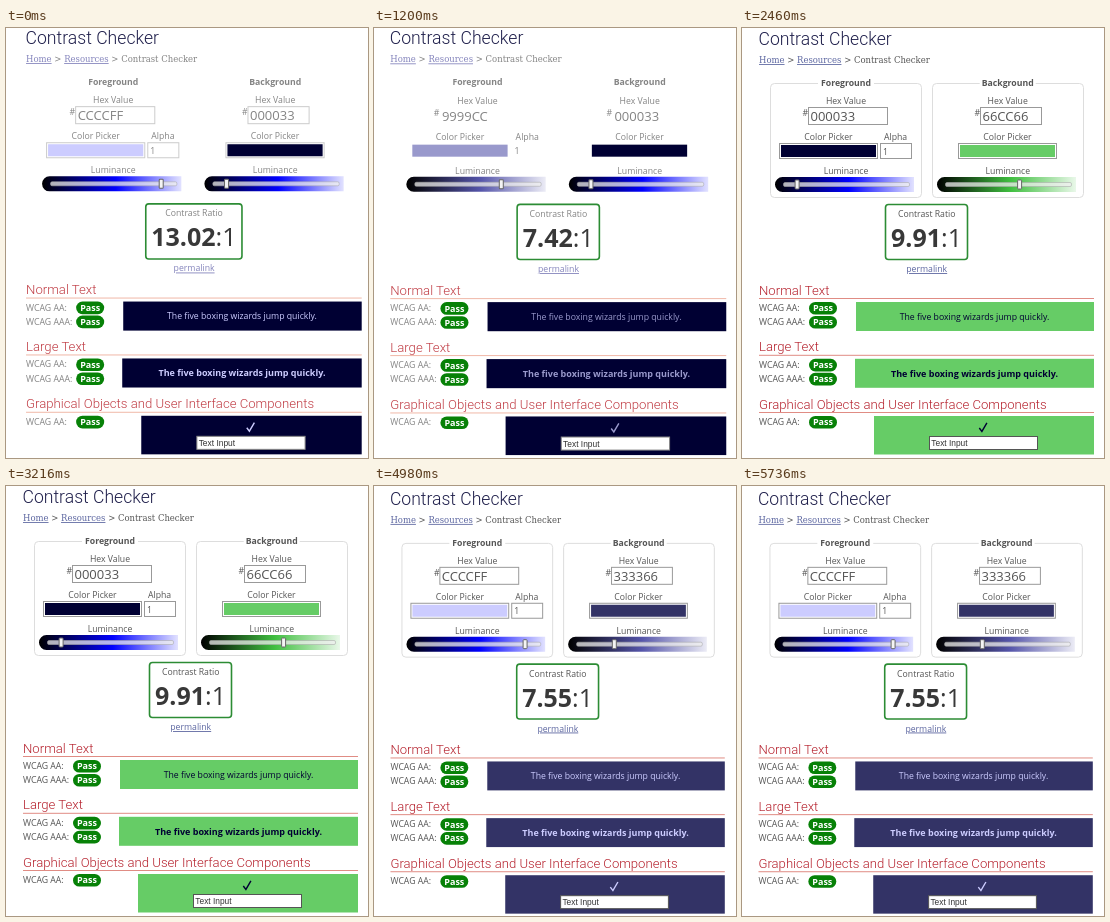
An HTML page that plays this animation: 362 by 430 pixels, repeating every 6.24 s.

```html
<!DOCTYPE html>
<html lang="en">
<head>
<meta charset="utf-8">
<title>Contrast Checker</title>
<style>
html, body { margin: 0; width: 100%; height: 100%; overflow: hidden; background: #fff; }
svg { display: block; position: absolute; left: 0; top: 0; }
text { font: 8.7px "Open Sans", "Noto Sans", sans-serif; fill: var(--ink); }
.slide { --ink: #555; --link: #5c66a0; --edge: #999; --line: #e08c84; --frame: #ddd; --red: #b5202c; }
.pale { --ink: #848484; --link: #8484bc; --edge: #ccc; --line: #f0b8a8; --frame: none; --red: #c03c44; }
.bare { --edge: none; }
.mid { text-anchor: middle; }
.bold { font-weight: 700; }
.title { font: 300 17.6px Roboto, sans-serif; fill: #20204c; }
.head { font: 300 13.15px Roboto, sans-serif; fill: var(--red); }
.crumb { font: 8.48px "DejaVu Serif", serif; }
.link { fill: var(--link); text-decoration: underline; }
.hex { font-size: 13px; }
.ratio { font-size: 25px; fill: #383838; }
.pass { font-size: 9px; font-weight: 700; fill: #fff; }
.large { font-size: 9px; font-weight: 700; }
.input { font: 8.4px "Liberation Sans", Arial, sans-serif; fill: #333; }
.s1, .s2, .s3, .s4 { animation: 6240ms step-end infinite; }
.s1 { animation-name: second; }
.s2 { animation-name: third; }
.s3 { animation-name: fourth; }
.s4 { animation-name: fifth; }
@keyframes second { 0% { visibility: hidden } 19.2307% { visibility: visible } }
@keyframes third { 0% { visibility: hidden } 39.423% { visibility: visible } }
@keyframes fourth { 0% { visibility: hidden } 59.6153% { visibility: visible } }
@keyframes fifth { 0% { visibility: hidden } 79.8076% { visibility: visible } }
</style>
</head>
<body>
<svg id="stage" width="362" height="430" viewBox="0 0 362 430"></svg>
<script>
// Each slide covers the ones before it; place = x, y, scale.
const slides = [
  { fg: 'CCCCFF', bg: '000033', ratio: '13.02', place: [3, -1, 1.002], look: 'pale' },
  { fg: '9999CC', bg: '000033', ratio: '7.42', place: [-0.8, -0.7, 1.003], look: 'pale bare' },
  { fg: '000033', bg: '66CC66', ratio: '9.91', place: [0, 0, 1], look: '' },
  { fg: '333333', bg: 'CCCCFF', ratio: '8.21', place: [7, 3, 0.98], look: '' },
  { fg: 'CCCCFF', bg: '333366', ratio: '7.55', place: [-0.5, 2, 0.998], look: '' }
];

const text = (x, y, cls, str, extra = '') =>
  `<text x="${x}" y="${y}" class="${cls}" ${extra}>${str}</text>`;
const rect = (x, y, w, h, fill, extra = '') =>
  `<rect x="${x}" y="${y}" width="${w}" height="${h}" fill="${fill}" ${extra}/>`;
const edge = 'stroke="var(--edge)"';

// Lightness of a hex colour, and the same hue at half lightness.
function tone(hex) {
  const rgb = [0, 2, 4].map(i => parseInt(hex.slice(i, i + 2), 16));
  const max = Math.max(...rgb), min = Math.min(...rgb), range = max - min;
  const sat = range / (255 - Math.abs(max + min - 255));
  const mid = rgb.map(c => Math.round(127.5 + 255 * sat * (range ? (c - min) / range - 0.5 : 0)));
  return { light: (max + min) / 510, mid: `rgb(${mid})` };
}

function slider(x, hex, id) {
  const { light, mid } = tone(hex);
  return `<linearGradient id="${id}" x2="1.06"><stop stop-color="#000"/>
    <stop offset=".5" stop-color="${mid}"/><stop offset="1" stop-color="#fff"/></linearGradient>
    <path d="M${x + 139} 149H${x + 7.5}a7.5 7.5 0 0 0 0 15H${x + 139}z" fill="url(#${id})"/>` +
    rect(x + 8.5, 154.5, 126, 4, '#efefef', 'rx="1.5" fill-opacity=".75" stroke="#aaa" stroke-opacity=".7" stroke-width=".8"') +
    rect(x + 8 + 121 * light, 152, 4, 9, '#f4f4f4', 'rx=".8" stroke="#666"');
}

function swatch(x, hex) {
  return rect(x + .5, 115.5, 98, 15, '#fff', edge) + rect(x + 2, 117, 95, 12, '#' + hex);
}

function side(name, x, mid, hex, inputX, inputW, swatchX, id) {
  return rect(x + .5, 55.5, 151, 114, 'none', 'rx="4" stroke="var(--frame)"') +
    rect(mid - 28, 50, 56, 10, '#fff') +
    text(mid, 58, 'mid bold', name) +
    text(mid, 76, 'mid', 'Hex Value') +
    text(inputX - 5.5, 88, '', '#') +
    rect(inputX + .5, 79.5, inputW, 17, '#fff', edge) +
    text(inputX + 2.5, 93, 'hex', hex) +
    text(swatchX + 49.5, 112, 'mid', 'Color Picker') +
    swatch(swatchX, hex) +
    text(mid, 146, 'mid', 'Luminance') +
    slider(x + 5, hex, id);
}

function grade(y, label) {
  return text(17, y + 3, '', `WCAG ${label}:`) +
    rect(67, y - 6, 28, 12.6, '#078107', 'rx="6.3"') +
    text(81, y + 3.4, 'pass mid', 'Pass');
}

function section(y, name, labels, panelX, panelH, bg) {
  return text(17, y, 'head', name) +
    rect(17, y + 3.5, 335, 1, 'var(--line)') +
    labels.map((l, i) => grade(y + 13.5 + 14 * i, l)).join('') +
    rect(panelX, y + 7.5, 352 - panelX, panelH, bg);
}

function slide({ fg, bg, ratio, place: [dx, dy, k], look }, i) {
  const fgCss = '#' + fg, bgCss = '#' + bg;
  const ink = `style="fill:${fgCss}"`;
  const sentence = 'The five boxing wizards jump quickly.';
  const boxW = 27 + 14 * ratio.length;
  const both = ['AA', 'AAA'];
  return `<g class="slide s${i} ${look}">${rect(0, 0, 362, 430, '#fff')}
    <g transform="translate(${dx} ${dy}) scale(${k})">` +
    text(16.5, 17, 'title', 'Contrast Checker') +
    text(17, 35, 'crumb', '<tspan class="link">Home</tspan> &gt; <tspan class="link">Resources</tspan> &gt; Contrast Checker') +
    side('Foreground', 28, 104, fg, 66, 79, 37, 'fg' + i) +
    text(142, 112, '', 'Alpha') +
    rect(138.5, 115.5, 31, 15, '#fff', edge) +
    text(141, 126.5, '', '1') +
    side('Background', 190, 265.7, bg, 238, 61, 216, 'bg' + i) +
    rect(185 - boxW / 2, 176.5, boxW - 1, 55, '#fff', 'rx="3" stroke="#2c8c34" stroke-width="1.6"') +
    text(184.7, 189, 'mid', 'Contrast Ratio') +
    text(184.5, 219, 'ratio mid', `<tspan class="bold">${ratio}</tspan>:1`) +
    text(184.7, 244, 'mid link', 'permalink') +
    section(266.5, 'Normal Text', both, 114, 29, bgCss) +
    text(232.5, 291.5, 'mid', sentence, ink) +
    section(323.3, 'Large Text', both, 113, 29, bgCss) +
    text(232.5, 348.5, 'mid large', sentence, ink) +
    section(380.5, 'Graphical Objects and User Interface Components', ['AA'], 132, 38.5, bgCss) +
    `<path d="M237.3 400l2.6 3.4 5-8.6" fill="none" stroke="${fgCss}" stroke-width="1.4"/>` +
    rect(187.5, 408.5, 108, 13, '#fff', `stroke="${look ? '#888' : '#555'}"`) +
    text(189.3, 418, 'input', 'Text Input') +
    '</g></g>';
}

document.getElementById('stage').innerHTML = slides.map(slide).join('');
</script>
</body>
</html>
```
